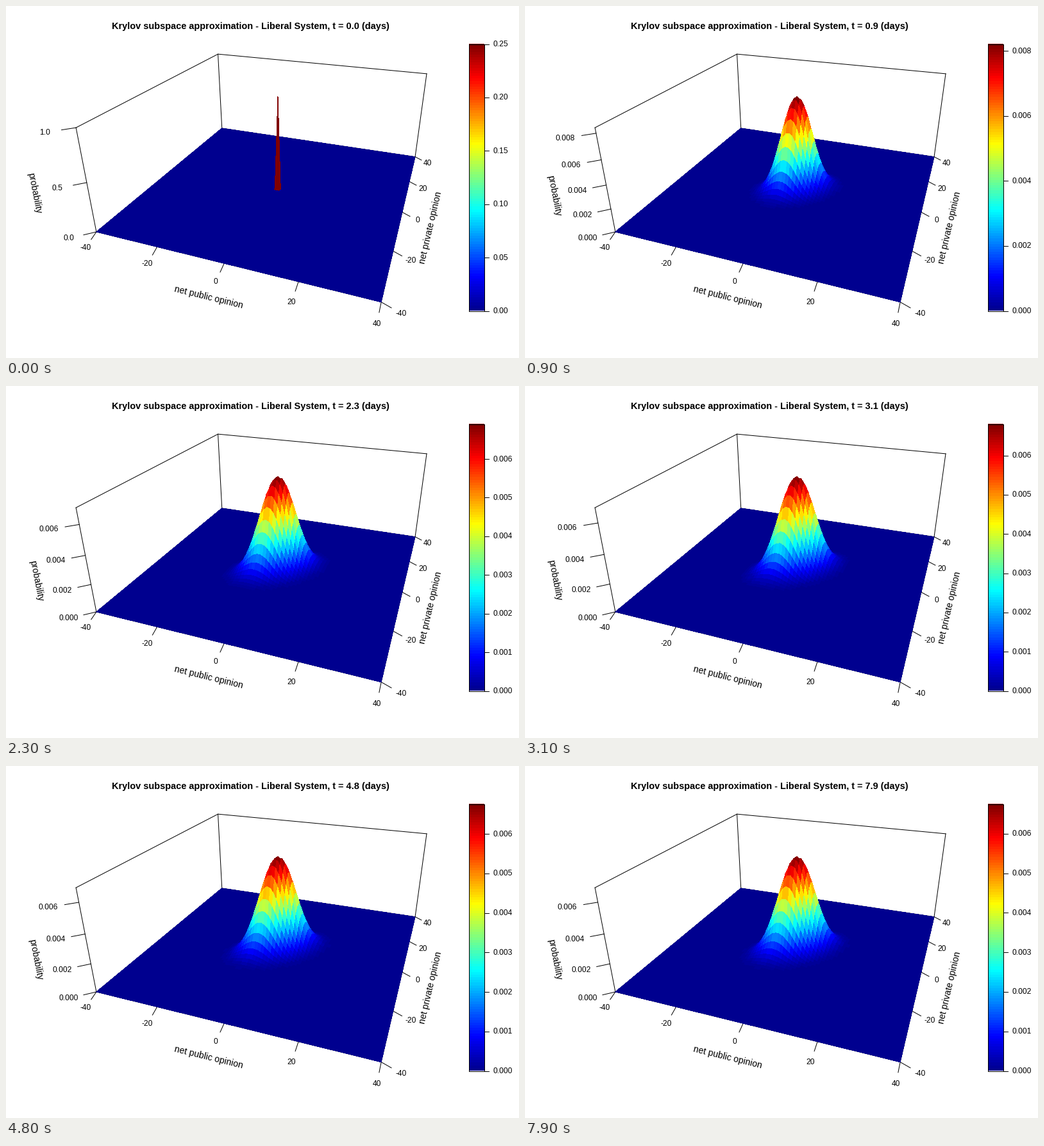
Recreate the animation shown at these times as a matplotlib script. Size 800 by 550 pixels, loop 8 s.

```python
import numpy as np
import matplotlib.pyplot as plt
from matplotlib.animation import FuncAnimation
from matplotlib.collections import PolyCollection

W, H, DPI = 800, 550, 100
FRAMES, INTERVAL = 80, 100
PX = 72 / DPI
LINE = dict(color="black", lw=PX, zorder=1)

plt.rcParams["font.family"] = "Liberation Sans"
fig = plt.figure(figsize=(W / DPI, H / DPI), dpi=DPI, facecolor="white")
ax = fig.add_axes([0, 0, 1, 1])
ax.axis("off")

# Camera: box coordinates in [-1, 1] and where they land on the stage
ANCHORS = [
    (-1, -1, -1, 141, 352), (1, -1, -1, 585.5, 461.5), (1, 1, -1, 638, 235),
    (-1, 1, -1, 336.5, 190.5), (-1, -1, 1, 109, 189.5), (1, 1, 1, 656, 105.5),
    (-1, 1, 1, 331, 74.5), (0, 0, 1, 423.5, 141), (-1, -1, 0, 126, 276),
    (0, -1, -1, 340, 402), (1, 0, -1, 618, 322),
]


def fit_camera(anchors):
    rows, rhs = [], []
    for x, y, z, u, v in anchors:
        p = [x, y, z]
        rows.append(p + [1, 0, 0, 0, 0] + [-u * c for c in p])
        rows.append([0, 0, 0, 0] + p + [1] + [-v * c for c in p])
        rhs += [u, v]
    sol = np.linalg.lstsq(np.array(rows, float), np.array(rhs, float), rcond=None)[0]
    return np.append(sol, 1).reshape(3, 4)


CAM = fit_camera(ANCHORS)


def homog(x, y, z):
    x, y, z = np.broadcast_arrays(x, y, z)
    return np.stack([x, y, z, np.ones(x.shape)], axis=-1) @ CAM.T


def project(x, y, z):
    q = homog(x, y, z)
    return q[..., :2] / q[..., 2:]


def jet(f):
    """Colours for values in 0..1, in 100 steps."""
    s = np.clip(np.floor(np.asarray(f) * 100), 0, 99) / 99
    stops = [0, 0.125, 0.375, 0.625, 0.875, 1]
    channels = ([0, 0, 0, 255, 255, 128],
                [0, 0, 255, 255, 0, 0],
                [143, 255, 255, 0, 0, 0])
    return np.stack([np.interp(s, stops, c) for c in channels], axis=-1) / 255


def pretty(top, n):
    """Round tick values from 0 to top, with their labels."""
    cell = top / n
    base = 10.0 ** np.floor(np.log10(cell) + 1e-9)
    c, unit = cell / base, 1
    if 2 - c < 0.8 * (c - 1):
        unit = 2
        if 5 - c < 1.7 * (c - 2):
            unit = 5
            if 10 - c < 0.8 * (c - 5):
                unit = 10
    step = unit * base
    digits = max(0, int(-np.floor(np.log10(step) + 1e-9)))
    ticks = step * np.arange(int(top / step + 1e-6) + 1)
    return ticks, [f"{v:.{digits}f}" for v in ticks]


def line(*pts, **kw):
    return ax.plot(*np.array(pts).T, **{**LINE, **kw})[0]


def text(pos, s, size, ha="center", va="center", **kw):
    return ax.text(*pos, s, fontsize=size * PX, ha=ha, va=va,
                   rotation_mode="anchor", **kw)


def shifted(p, d, k):
    return project(*(np.array(p, float) + k * np.array(d)))


def tick(p, d, label, gap):
    return [line(project(*p), shifted(p, d, 0.06)),
            text(shifted(p, d, gap), label, 12)]


def slope(p, q):
    dx, dy = project(*q) - project(*p)
    return -np.degrees(np.arctan2(dy, dx))


# Box, fixed axes and floor
A, B, C, D = (-1, -1), (1, -1), (1, 1), (-1, 1)
DOWN_X, DOWN_Y, DOWN_Z = (0, -1, -1), (1, 0, -1), (-1, -1, 0)
line(*(project(*c, -1) for c in (A, B, C, D, A)))
line(*(project(*c, 1) for c in (A, D, C)))
for c in (A, C, D):
    line(project(*c, -1), project(*c, 1))

for v in range(-40, 41, 20):
    tick((v / 40, -1, -1), DOWN_X, str(v), 0.126)
    tick((1, v / 40, -1), DOWN_Y, str(v), 0.119)
text(shifted((0, -1, -1), DOWN_X, 0.222), "net public opinion", 14,
     rotation=slope((*A, -1), (*B, -1)))
text(shifted((1, 0, -1), DOWN_Y, 0.219), "net private opinion", 14,
     rotation=slope((*B, -1), (*C, -1)))
Z_ANGLE = slope((*A, 1), (*A, -1))

ax.fill(*np.array([project(*c, -1) for c in (A, B, C, D)]).T,
        color=jet(0), lw=0, antialiased=False, zorder=2)

# Colour key
KEY_L, KEY_R, KEY_T, KEY_B = 721.5, 745.5, 59, 476
ax.imshow(jet((np.arange(100) + 0.5) / 100)[:, None], origin="lower",
          extent=(KEY_L, KEY_R, KEY_B, KEY_T), aspect="auto",
          interpolation="nearest", zorder=1)
line((KEY_L, KEY_B), (KEY_R, KEY_B), (KEY_R, KEY_T), (KEY_L, KEY_T),
     (KEY_L, KEY_B), zorder=4)

# Surface: unit grid around the middle, the rest stays flat
n = np.arange(-24, 25)
gx, gy = np.meshgrid(n, n, indexing="ij")
u2, v2 = (gx + gy) ** 2 / 2, (gx - gy) ** 2 / 2
order = np.argsort(-homog((gx[:-1, :-1] + 0.5) / 40,
                          (gy[:-1, :-1] + 0.5) / 40, -1.0)[..., 2].ravel())


def corners(a):
    return np.stack([a[:-1, :-1], a[1:, :-1], a[1:, 1:], a[:-1, 1:]], axis=2)


def density(t):
    """Probability spreading from the middle to its steady state."""
    if t == 0:
        return (u2 + v2 == 0).astype(float)
    su = 38 * (1 - np.exp(-1.35 * t))
    sv = 14.1 * (1 - np.exp(-3.35 * t))
    return np.exp(-u2 / (2 * su) - v2 / (2 * sv)) / (2 * np.pi * np.sqrt(su * sv))


surface = PolyCollection([], linewidths=0, edgecolors="none",
                         antialiaseds=False, zorder=3)
ax.add_collection(surface, autolim=False)
# Keeps the spike visible where its facets are thinner than a pixel
line(project(0, 0, -1), project(0, 0, 0.99), color=jet(1), zorder=2.5)

title = text((381, 35.5), "", 14.5, va="baseline", weight="bold")
# Pixel rows are counted at their centres
ax.set_xlim(0, W)
ax.set_ylim(H - 0.5, -0.5)
live = []


def update(i):
    while live:
        live.pop().remove()
    t = i / 10
    title.set_text(f"Krylov subspace approximation - Liberal System, t = {t:.1f} (days)")

    p = density(t)
    peak = p.max()
    quads = corners(project(gx / 40, gy / 40, 2 * p / peak - 1)).reshape(-1, 4, 2)
    mean = corners(p).mean(axis=2).ravel()
    surface.set_verts(quads[order])
    surface.set_facecolor(jet(mean[order] / mean.max()))

    ticks, labels = pretty(peak, 3)
    for v, s in zip(ticks, labels):
        live.extend(tick((*A, 2 * v / peak - 1), DOWN_Z, s, 0.128))
    live.append(text(shifted((*A, ticks[-1] / peak - 1), DOWN_Z, 0.227),
                     "probability", 14, rotation=Z_ANGLE))

    for v, s in zip(*pretty(mean.max(), 5)):
        y = KEY_B + (KEY_T - KEY_B) * v / mean.max()
        live.append(line((KEY_R, y), (KEY_R + 7, y)))
        live.append(text((760, y + 0.5), s, 12, ha="left"))
    return []


anim = FuncAnimation(fig, update, frames=FRAMES, interval=INTERVAL,
                     repeat=True, repeat_delay=0, blit=False)
plt.show()
```
